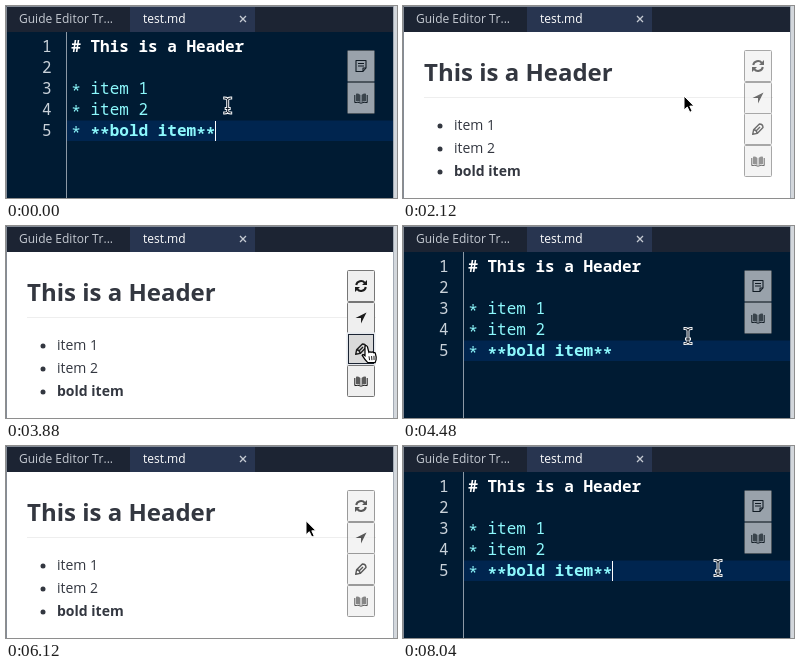
Animation, 391 px wide and 192 px high, one loop 8.08 s. Source, as an HTML page:

```html
<!DOCTYPE html>
<html lang="en">
<head>
<meta charset="utf-8">
<title>Markdown preview toggle</title>
<style>
  html, body { margin: 0; width: 100%; height: 100%; overflow: hidden; background: #001b33; }
  svg { display: block; width: 391px; height: 192px; }
  text { white-space: pre; }
  .tabs { font: 12px "Open Sans", sans-serif; font-kerning: none; fill: #fff; }
  .code { font: 500 16px "Noto Sans Mono", monospace; fill: #8cf8fc; }
  .page { font: 14px "Open Sans", sans-serif; fill: #333740; }
  .bold { font-weight: 700; }
  .title { font-size: 24px; }
  .icon { fill: none; stroke: #1c1c1c; stroke-width: 1.1; stroke-linejoin: round; }
  .solid { fill: #1c1c1c; stroke: none; }
</style>
</head>
<body>
<svg viewBox="0 0 391 192">
  <defs>
    <path id="beamShape" d="M-3-7.5Q0-7.5 0-5.5Q0-7.5 3-7.5M0-5.5V5.5M-3 7.5Q0 7.5 0 5.5Q0 7.5 3 7.5M-1.5 3H1.5"/>
  </defs>
  <g id="editor">
    <rect width="391" height="192" fill="#001b33"/>
    <rect x="61" y="114.5" width="326" height="20.5" fill="#00254f"/>
    <rect x="60" y="26" width="1" height="166" fill="#8b98a5"/>
    <g id="lines" class="code"></g>
    <rect id="caret" x="209" y="115" width="1" height="20" fill="#fff"/>
    <g id="editorBar"></g>
  </g>
  <g id="preview">
    <rect width="391" height="192" fill="#fff"/>
    <rect x="21" y="91" width="349" height="1" fill="#eee"/>
    <g class="page">
      <text class="bold title" x="21" y="75">This is a Header</text>
      <circle cx="37" cy="120" r="2.5"/><text x="51" y="124">item 1</text>
      <circle cx="37" cy="143" r="2.5"/><text x="51" y="147">item 2</text>
      <circle cx="37" cy="166" r="2.5"/><text class="bold" x="51" y="170">bold item</text>
    </g>
    <g id="previewBar"></g>
  </g>
  <g class="tabs">
    <rect width="391" height="26" fill="#1c2433"/>
    <rect x="124" width="125" height="26" fill="#283550"/>
    <text x="13" y="17" style="fill:#c5cad2">Guide Editor Tr...</text>
    <text x="137" y="17">test.md</text>
    <path d="M234 10l6 6m0-6l-6 6" stroke="#c5cad2" stroke-width="1.3"/>
  </g>
  <path d="M.5 192V.5H388" fill="none" stroke="#858c96"/>
  <rect x="387" width="4" height="192" fill="#d3d7dc"/>
  <path d="M387.5 0V192" stroke="#a3abb5"/>
  <g id="cursor">
    <path id="arrow" d="M0 0V14L3.3 11L5.8 16.3L8.2 15.2L5.8 10.1H10Z" fill="#000" stroke="#fff"/>
    <g id="beam" fill="none" stroke-linecap="square">
      <use href="#beamShape" stroke="#f4f6f8" stroke-width="3"/>
      <use href="#beamShape" stroke="#0a1420" stroke-width="1"/>
    </g>
    <g id="hand" transform="translate(-5.5 -1.5) scale(1.12)">
      <path d="M4 1.5q1.5-1 2.2.5l1.3 5q1.2-1 2 0 1.2-.8 2 .3 1.5-.5 1.8.9l.7 3q.3 2-1 5h-6.5q-2.5-2.5-5-6.5q.5-1.5 2.5.3z" fill="#fff" stroke="#000" stroke-width="1.1"/>
      <path d="M7.6 10.5l.5 3.5m1.8-3.7l.3 3.7m1.8-3.9l.1 3.7" stroke="#000" stroke-width=".8"/>
    </g>
  </g>
</svg>
<script>
const LOOP = 8080;
const DIM = 0.64;
const $ = id => document.getElementById(id);
const show = (el, on) => el.setAttribute('visibility', on ? 'inherit' : 'hidden');

// Asterisks sit at mid height, so they are lowered and the rest is raised back.
const lower = s => s.replace(/(\*+)([^*]*)/g, '<tspan dy="3">$1</tspan><tspan dy="-3">$2</tspan>');
const source = ['# This is a Header', '', '* item 1', '* item 2', '* **bold item**'];
$('lines').innerHTML = source.map((line, i) => {
  const y = 46 + 21 * i;
  const body = i < 4 ? lower(line)
    : lower('* ') + '<tspan class="bold">' + lower('**bold item**') + '</tspan>';
  const style = i ? '' : 'class="bold" style="fill:#fff"';
  return `<text x="45.5" y="${y}" text-anchor="end" style="fill:#c9d2da">${i + 1}</text>
    <text x="65.3" y="${y}" ${style}>${body}</text>`;
}).join('');

const icons = {
  note: '<path d="M-5-5.5H5V2L2 5.5H-5ZM5 2H2V5.5M-3-2.5H3M-3 0H3"/>',
  book: `<path class="solid" fill-opacity=".7" d="M-.6-3Q-3-5-5-4.3V3Q-3 2.6-.6 4ZM.6-3Q3-5 5-4.3V3Q3 2.6.6 4Z"/>
    <path d="M-6.2-3V4.6Q-3 3.6 0 5.2Q3 3.6 6.2 4.6V-3" stroke-width="1"/>`,
  refresh: `<path d="M-4.8-1A4.9 4.9 0 0 1 3.8-3.2M4.8 1A4.9 4.9 0 0 1-3.8 3.2" stroke-width="2"/>
    <path class="solid" d="M6-6V-1H1ZM-6 6V1H-1Z"/>`,
  locate: '<path class="solid" d="M5.5-5.5L-5.5 0H0V5.5Z"/>',
  pencil: '<path d="M-5.3 5.3L-4.4 .8L1.4-5Q5-5 5-1.4L-.8 4.4ZM-2 2L2-2M-4.4 .8Q-1.4 1-.8 4.4" stroke-width="1.4"/>'
};

function buildBar(id, names) {
  $(id).innerHTML = names.map((name, i) => `<g transform="translate(341 ${44 + Math.round(31.7 * i)})">
    <rect x=".5" y=".5" width="27" height="31" rx="1" fill="#efefef" stroke="#767676"/>
    <g class="press" opacity="0">
      <rect x=".25" y=".25" width="27.5" height="31.5" fill="none" stroke="#e6e9ee" stroke-width="1.5"/>
      <rect x="1.5" y="1.5" width="25" height="29" fill="#dadada" stroke="#1b2433"/>
    </g>
    <g class="icon" transform="translate(14 16)">${icons[name]}</g></g>`).join('');
  return $(id).querySelectorAll('.press');
}
const editorPress = buildBar('editorBar', ['note', 'book'])[0];
const previewPress = buildBar('previewBar', ['refresh', 'locate', 'pencil', 'book'])[2];

// Pointer hotspot: time, x, y
const path = [
  [0, 221.7, 99.5], [220, 221.7, 99.5], [720, 355, 63], [1880, 355, 63], [2120, 281, 90],
  [2640, 281, 90], [3180, 363, 117], [3280, 361, 120], [3400, 361, 120], [3440, 360, 120],
  [4160, 360, 120], [4480, 285, 110], [4880, 285, 110], [5440, 350, 54], [5960, 350, 54],
  [6280, 251, 95], [6640, 251, 95], [7040, 339, 121], [7240, 356, 121], [7760, 356, 121],
  [8040, 315, 122], [LOOP, 315, 122]
];
const previewTimes = [[1160, 3920], [5760, 7760]];
const hoverTimes = [[620, 1960], [3000, 4200], [5240, 6040], [7060, 7800]];
const editorPressTimes = [[880, 1160], [5520, 5760]];
const previewPressTimes = [[3680, 3920], [7560, 7760]];
const caretTimes = [[0, 480], [3920, 4420], [4920, 5420], [7760, LOOP]];

const within = (t, spans) => spans.some(([a, b]) => t >= a && t < b);
const clamp = v => Math.max(0, Math.min(1, v));
const ramp = (t, start) => t < start ? 0 : clamp((t - start + 30) / 150);
const fadeIn = (t, spans) => Math.max(...spans.map(([a, b]) => t < b ? ramp(t, a) : 0));
const fadeInOut = (t, spans) => Math.max(...spans.map(([a, b]) => ramp(t, a) * (1 - ramp(t, b))));

function pointerAt(t) {
  const i = path.findIndex(p => p[0] > t);
  const [t0, x0, y0] = path[i - 1], [t1, x1, y1] = path[i];
  const u = (t - t0) / (t1 - t0), e = u * u * (3 - 2 * u);
  return [x0 + (x1 - x0) * e, y0 + (y1 - y0) * e];
}

function draw(t) {
  const preview = within(t, previewTimes), hover = within(t, hoverTimes);
  show($('editor'), !preview);
  show($('preview'), preview);
  show($('caret'), !preview && within(t, caretTimes));
  const opacity = DIM + (1 - DIM) * fadeInOut(t, hoverTimes);
  $('editorBar').setAttribute('opacity', opacity);
  $('previewBar').setAttribute('opacity', opacity);
  editorPress.setAttribute('opacity', fadeIn(t, editorPressTimes));
  previewPress.setAttribute('opacity', fadeIn(t, previewPressTimes));
  show($('hand'), hover);
  show($('arrow'), !hover && preview);
  show($('beam'), !hover && !preview);
  const [x, y] = pointerAt(t);
  $('cursor').setAttribute('transform', `translate(${x.toFixed(1)} ${y.toFixed(1)})`);
}

function tick() {
  draw(performance.now() % LOOP);
  requestAnimationFrame(tick);
}
tick();
</script>
</body>
</html>
```
